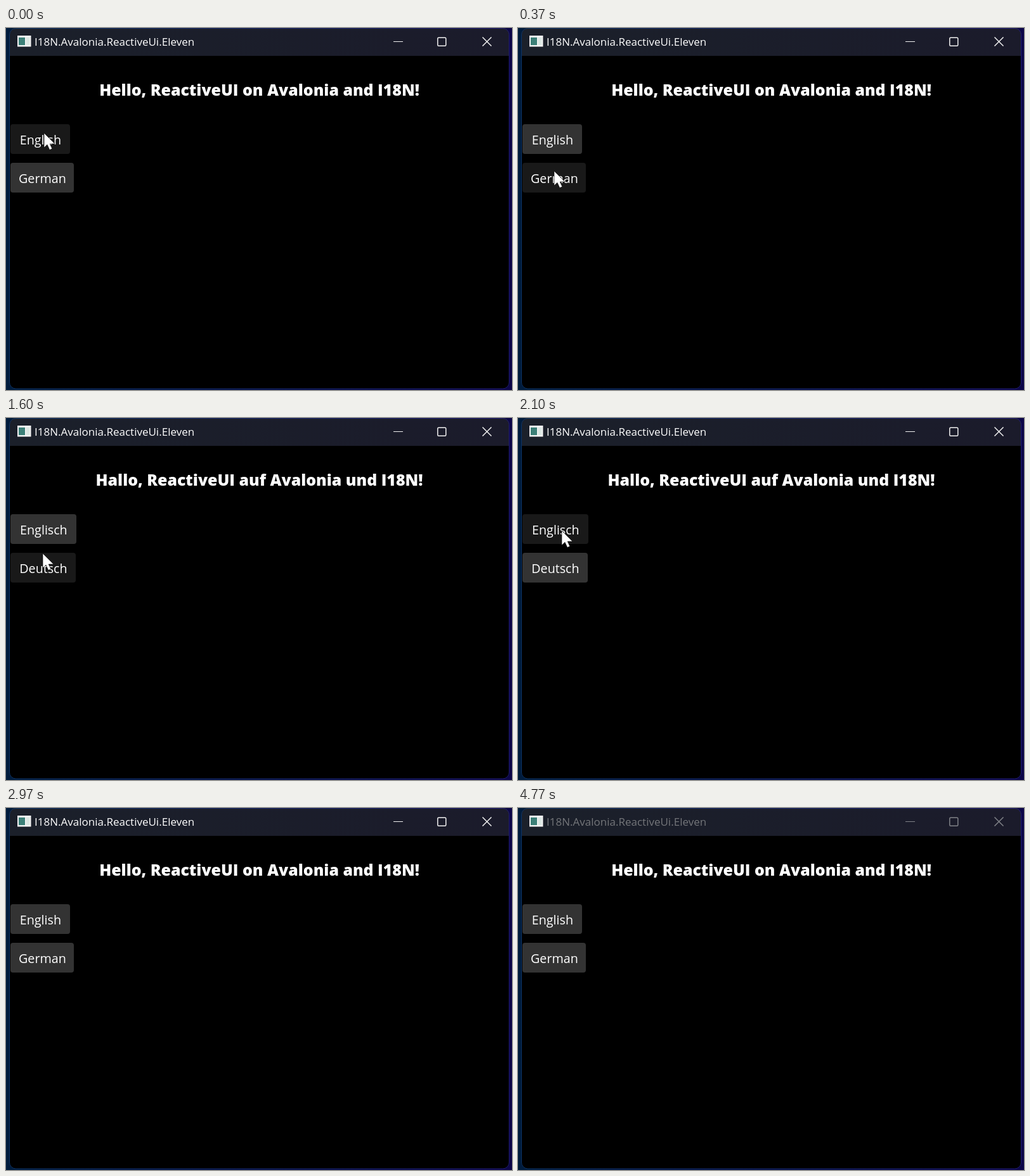
An HTML page that plays this animation: 798 px wide and 572 px high, repeating every 4810 ms.

```html
<!DOCTYPE html>
<html lang="en">
<head>
<meta charset="utf-8">
<title>Language switch</title>
<style>
html, body { margin: 0; width: 100%; height: 100%; overflow: hidden; background: #000; }
svg { display: block; width: 798px; height: 572px; font-family: "Open Sans", "Noto Sans", sans-serif; }
.caption { font-size: 17px; }
.heading { font-size: 24.9px; font-weight: 800; fill: #fff; text-anchor: middle; }
.label { font-size: 19.7px; fill: #fff; text-anchor: middle; }
.glyph { fill: none; stroke-width: 1.5; }
</style>
</head>
<body>
<svg viewBox="0 0 798 572">
  <defs>
    <linearGradient id="desktop">
      <stop offset="0" stop-color="#001c3c"/>
      <stop offset="1" stop-color="#0c0648"/>
    </linearGradient>
    <linearGradient id="edge">
      <stop offset="0" stop-color="#0c3468"/>
      <stop offset="1" stop-color="#201c78"/>
    </linearGradient>
    <linearGradient id="bar">
      <stop offset="0" stop-color="#1b202a"/>
      <stop offset="1" stop-color="#1b1b2b"/>
    </linearGradient>
    <clipPath id="frame"><rect x="5" y="0" width="789" height="570" rx="10"/></clipPath>
  </defs>
  <rect width="798" height="572" fill="url(#desktop)"/>
  <g clip-path="url(#frame)">
    <rect width="798" height="572"/>
    <rect width="798" height="44" fill="url(#bar)"/>
  </g>
  <rect x="5.5" y=".5" width="788" height="569.5" rx="10" fill="none" stroke="url(#edge)"/>

  <rect x="18" y="12" width="21.5" height="17.5" fill="#f4f4f4"/>
  <rect x="20" y="15" width="10" height="12" fill="#3c8078"/>
  <rect x="31.5" y="15" width="6" height="12" fill="#dce8e4"/>

  <text id="caption" class="caption" x="45" y="27.5">I18N.Avalonia.ReactiveUi.Eleven</text>
  <g id="glyphs" class="glyph">
    <path d="M611 21.5h15" stroke-width="1"/>
    <rect x="680.8" y="15.2" width="13" height="13" rx="1.5"/>
    <path d="M751.5 14.5l14 14m0-14l-14 14"/>
  </g>

  <text id="heading" class="heading" x="399.5" y="107"></text>
  <rect id="box0" x="7" y="152" height="47" rx="4"/>
  <text id="label0" class="label" y="184"></text>
  <rect id="box1" x="7" y="213" height="47" rx="4"/>
  <text id="label1" class="label" y="245"></text>

  <path id="cursor" d="M0 0V23L5 18.3L8.8 26.6L12.8 24.8L9.2 17H17Z" fill="#fff" stroke="#000" stroke-width=".6"/>
</svg>
<script>
const LOOP = 4810;
const $ = id => document.getElementById(id);

const languages = {
  en: { heading: "Hello, ReactiveUI on Avalonia and I18N!", labels: ["English", "German"], widths: [94, 100] },
  de: { heading: "Hallo, ReactiveUI auf Avalonia und I18N!", labels: ["Englisch", "Deutsch"], widths: [104, 103] }
};
const tops = [152, 213];

const smooth = u => u * u * (3 - 2 * u);
const speedUp = u => u * u;
const slowDown = u => u * (2 - u);

// time, x, y of the pointer tip, easing towards that point
const path = [
  [0, 60, 166], [30, 60, 166, smooth], [370, 57, 226, smooth],
  [1400, 57, 226, smooth], [1600, 58, 214, speedUp], [1770, 68, 182, slowDown],
  [2000, 68, 182, smooth], [2100, 69, 178, smooth],
  [2700, 69, 178, smooth], [2970, 72, -27, speedUp]
];

function pointer(t) {
  const i = path.findIndex(p => p[0] > t);
  if (i < 0) return null;
  const [t0, x0, y0] = path[i - 1], [t1, x1, y1, ease] = path[i];
  const k = ease((t - t0) / (t1 - t0));
  return { x: x0 + (x1 - x0) * k, y: y0 + (y1 - y0) * k };
}

function draw(t) {
  const lang = languages[t >= 1400 && t < 2700 ? "de" : "en"];
  const tip = pointer(t);
  const active = t < 4730;

  $("caption").setAttribute("fill", active ? "#fff" : "#74767a");
  $("glyphs").setAttribute("stroke", active ? "#f0f0f0" : "#808288");
  $("heading").textContent = lang.heading;

  tops.forEach((top, i) => {
    const width = lang.widths[i];
    const hover = tip && tip.x >= 7 && tip.x < 7 + width && tip.y >= top && tip.y < top + 47;
    $("box" + i).setAttribute("width", width);
    $("box" + i).setAttribute("fill", hover ? "#191919" : "#333");
    $("label" + i).setAttribute("x", 7.4 + width / 2);
    $("label" + i).textContent = lang.labels[i];
  });

  $("cursor").style.display = tip ? "" : "none";
  if (tip) $("cursor").setAttribute("transform", `translate(${Math.round(tip.x)} ${Math.round(tip.y)})`);
}

const start = performance.now();
function tick() {
  draw((performance.now() - start) % LOOP);
  requestAnimationFrame(tick);
}
tick();
</script>
</body>
</html>
```
